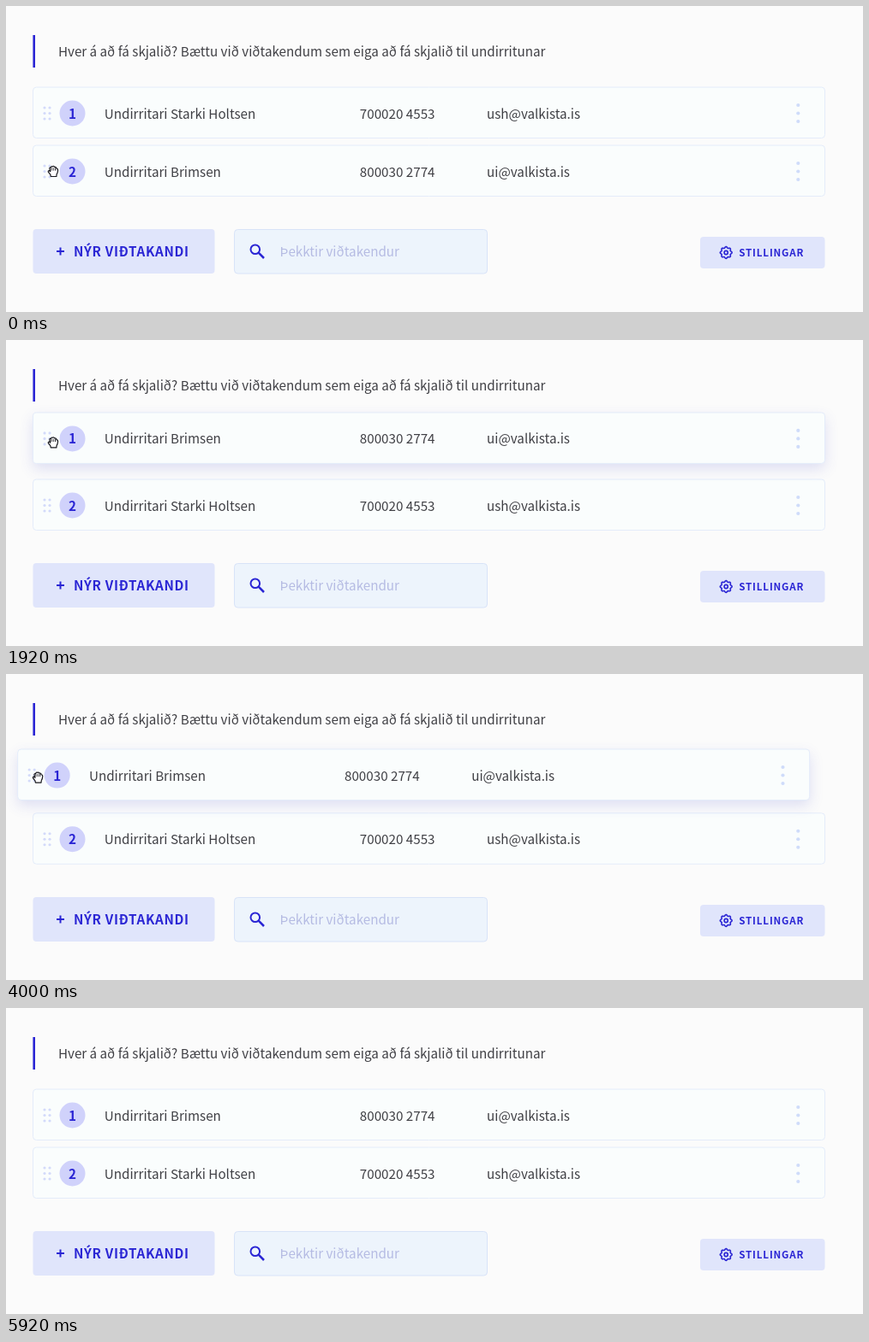
An HTML page with a canvas for the animation above (6 s loop, 1000x358 px).

```html
<!DOCTYPE html>
<html lang="is">
<head>
<meta charset="utf-8">
<title>Viðtakendur</title>
<style>
  html, body { margin: 0; width: 100%; height: 100%; overflow: hidden; background: #fbfbfb; }
  canvas { display: block; width: 1000px; height: 358px; }
</style>
</head>
<body>
<canvas id="stage"></canvas>
<script>
const W = 1000, H = 358, LOOP = 6000, STEP = 80;
const FONT = '"Noto Sans CJK JP", "Noto Sans CJK SC", "Noto Sans CJK", "Noto Sans", sans-serif';
const BLUE = '#2a25d4', INK = '#3f3f44';
const TOP = 125.5, BOTTOM = 193.5;
const DROP = 4600, GONE = 5040;

const canvas = document.getElementById('stage');
const ctx = canvas.getContext('2d');
const ratio = window.devicePixelRatio || 1;
canvas.width = W * ratio;
canvas.height = H * ratio;

const people = {
  moved: { name: 'Undirritari Brimsen', id: '800030 2774', mail: 'ui@valkista.is' },
  other: { name: 'Undirritari Starki Holtsen', id: '700020 4553', mail: 'ush@valkista.is' }
};

// turning points of the drag
const turns = [
  { t: 600, dx: 0, y: BOTTOM },
  { t: 960, dx: 1, y: 110.5 },
  { t: 1990, dx: 0, y: 115.5 },
  { t: 2610, dx: -19, y: 206 },
  { t: 3480, dx: -9.5, y: 209.5 },
  { t: 4050, dx: -18, y: 116.5 },
  { t: DROP, dx: -15, y: 115 }
];

const ramp = (t, a, b) => Math.max(0, Math.min(1, (t - a) / (b - a)));
const mix = (a, b, p) => a + (b - a) * p;
const smooth = p => p * p * (3 - 2 * p);

function dragged(t) {
  const i = Math.max(1, turns.findIndex(k => k.t > t));
  const b = t >= DROP ? turns.length - 1 : i, from = turns[b - 1], to = turns[b];
  const p = smooth(ramp(t, from.t, to.t));
  return { dx: mix(from.dx, to.dx, p), y: mix(from.y, to.y, p) };
}

// cubic-bezier(.2, 0, 0, 1)
function settle(p) {
  let lo = 0, hi = 1;
  for (let i = 0; i < 20; i++) {
    const s = (lo + hi) / 2;
    if (0.6 * s * (1 - s) ** 2 + s ** 3 < p) lo = s; else hi = s;
  }
  return smooth(lo);
}

// the rows trade places whenever the dragged one passes a threshold
const swaps = [];
for (let t = 0, high = false; t < DROP; t += 4) {
  const { y } = dragged(t);
  if (high ? y > 163 : y < 150) {
    high = !high;
    swaps.push({ t, high });
  }
}

function otherRow(t) {
  const last = swaps.filter(s => s.t <= t).pop();
  if (!last) return { y: TOP, number: 1 };
  const p = settle(ramp(t, last.t, last.t + 200));
  return last.high
    ? { y: mix(TOP, BOTTOM, p), number: 2 }
    : { y: mix(BOTTOM, TOP, p), number: 1 };
}

function text(str, x, y, color, { size = 15.2, weight = 400, gap = 0, align = 'left' } = {}) {
  ctx.font = `${weight} ${size}px ${FONT}`;
  ctx.letterSpacing = gap + 'px';
  ctx.textAlign = align;
  ctx.fillStyle = color;
  ctx.fillText(str, x, y);
}

function box(x, y, w, h, fill, border) {
  ctx.beginPath();
  ctx.roundRect(x, y, w, h, 4);
  ctx.fillStyle = fill;
  ctx.fill();
  if (!border) return;
  ctx.shadowColor = 'transparent';
  ctx.strokeStyle = border;
  ctx.lineWidth = 1;
  ctx.stroke();
}

function dot(x, y, r, color) {
  ctx.beginPath();
  ctx.arc(x, y, r, 0, Math.PI * 2);
  ctx.fillStyle = color;
  ctx.fill();
}

function ring(x, y, r, width) {
  ctx.beginPath();
  ctx.arc(x, y, r, 0, Math.PI * 2);
  ctx.strokeStyle = BLUE;
  ctx.lineWidth = width;
  ctx.stroke();
}

function line(color, width, x1, y1, x2, y2) {
  ctx.beginPath();
  ctx.moveTo(x1, y1);
  ctx.lineTo(x2, y2);
  ctx.strokeStyle = color;
  ctx.lineWidth = width;
  ctx.stroke();
}

function row(person, number, dx, y, lift = 0) {
  ctx.save();
  ctx.translate(dx, y);
  if (lift) {
    ctx.shadowColor = `rgba(70, 75, 200, ${0.17 * lift})`;
    ctx.shadowBlur = 16 * ratio;
    ctx.shadowOffsetY = 6 * ratio;
  }
  box(31.5, -30.5, 924, 59.5, '#fafdfd', '#e4ecfa');
  for (let i = -1; i <= 1; i++) {
    dot(45, i * 6.5, 1.6, '#d3dafa');
    dot(51, i * 6.5, 1.6, '#d3dafa');
    dot(924.3, i * 9.5, 2.1, '#cfdcfa');
  }
  dot(77.5, 0, 15, '#d0d2fb');
  text(number, 77.5, 6, BLUE, { weight: 700, align: 'center' });
  text(person.name, 114.8, 6, INK);
  text(person.id, 412.8, 6, INK);
  text(person.mail, 561, 6, INK);
  ctx.restore();
}

function gear(cx, cy) {
  ctx.beginPath();
  for (let a = 0; a < Math.PI * 2; a += 0.06) {
    const r = 6.2 + 0.7 * Math.cos(8 * a);
    ctx.lineTo(cx + r * Math.cos(a), cy + r * Math.sin(a));
  }
  ctx.closePath();
  ctx.strokeStyle = BLUE;
  ctx.lineWidth = 1.6;
  ctx.stroke();
  ring(cx, cy, 2.1, 1.6);
}

function controls() {
  ctx.fillStyle = BLUE;
  ctx.fillRect(31.4, 34, 2.6, 38);
  text('Hver á að fá skjalið? Bættu við viðtakendum sem eiga að fá skjalið til undirritunar', 61, 59, INK);

  box(31.5, 261, 212, 52, '#e0e5fb');
  line(BLUE, 2, 59, 287, 68, 287);
  line(BLUE, 2, 63.5, 282.5, 63.5, 291.5);
  text('NÝR VIÐTAKANDI', 79, 293, BLUE, { weight: 700, gap: 0.7 });

  box(266.5, 261.5, 295, 51.5, '#edf4fc', '#d8e3f8');
  ring(290.8, 284.8, 5.3, 2);
  line(BLUE, 2.5, 294.7, 288.7, 301, 295);
  text('Þekktir viðtakendur', 319.5, 293, '#b5bbe3');

  box(810, 270, 145.5, 37, '#e0e5fb');
  gear(840.2, 288.5);
  text('STILLINGAR', 855.2, 292.5, BLUE, { size: 11.6, weight: 700, gap: 0.85 });
}

const palm = new Path2D('M-3 6.5L-3.5 4L-6 1Q-6.8-1-5-1L-3.5 .2L-4.6-3.5Q-4.6-5.4-2.8-4.8' +
  'Q-2.4-7-.4-6.2Q1-7.2 2-5.4Q4-6 4.3-3.6Q6.2-3.5 6-1Q5.8 2 4.4 4L4.2 6.5Z');

function hand(x, y) {
  ctx.save();
  ctx.translate(x, y);
  ctx.scale(0.92, 0.92);
  ctx.lineJoin = 'round';
  ctx.fillStyle = '#fff';
  ctx.fill(palm);
  ctx.strokeStyle = '#17171c';
  ctx.lineWidth = 1.3;
  ctx.stroke(palm);
  for (let i = -1; i <= 1; i++) {
    line('#17171c', 1, i * 2.5, -4.6, i * 2.5 + 0.2, -1);
  }
  ctx.restore();
}

function draw(t) {
  ctx.setTransform(ratio, 0, 0, ratio, 0, 0);
  ctx.fillStyle = '#fbfbfb';
  ctx.fillRect(0, 0, W, H);
  controls();

  const held = dragged(t), other = otherRow(t);
  const drop = 1 - (1 - ramp(t, DROP, 4960)) ** 3;
  const lift = ramp(t, 160, 400) * (1 - ramp(t, 4800, GONE));
  row(people.other, other.number, 0, other.y);
  row(people.moved, 3 - other.number, mix(held.dx, 0, drop), mix(held.y, TOP, drop), lift);

  // the pointer runs slightly ahead of the row, then leaves to the left
  const exit = ramp(t, 4680, GONE) ** 2;
  const ahead = dragged(t + 40).y + 4.5 * ramp(t, 80, 240);
  if (t < GONE) hand(55 + held.dx - 50 * exit, ahead + 10 * exit);
}

const origin = performance.now();
function tick() {
  const t = (performance.now() - origin) % LOOP;
  draw(Math.floor(t / STEP) * STEP);
  requestAnimationFrame(tick);
}
tick();
</script>
</body>
</html>
```
